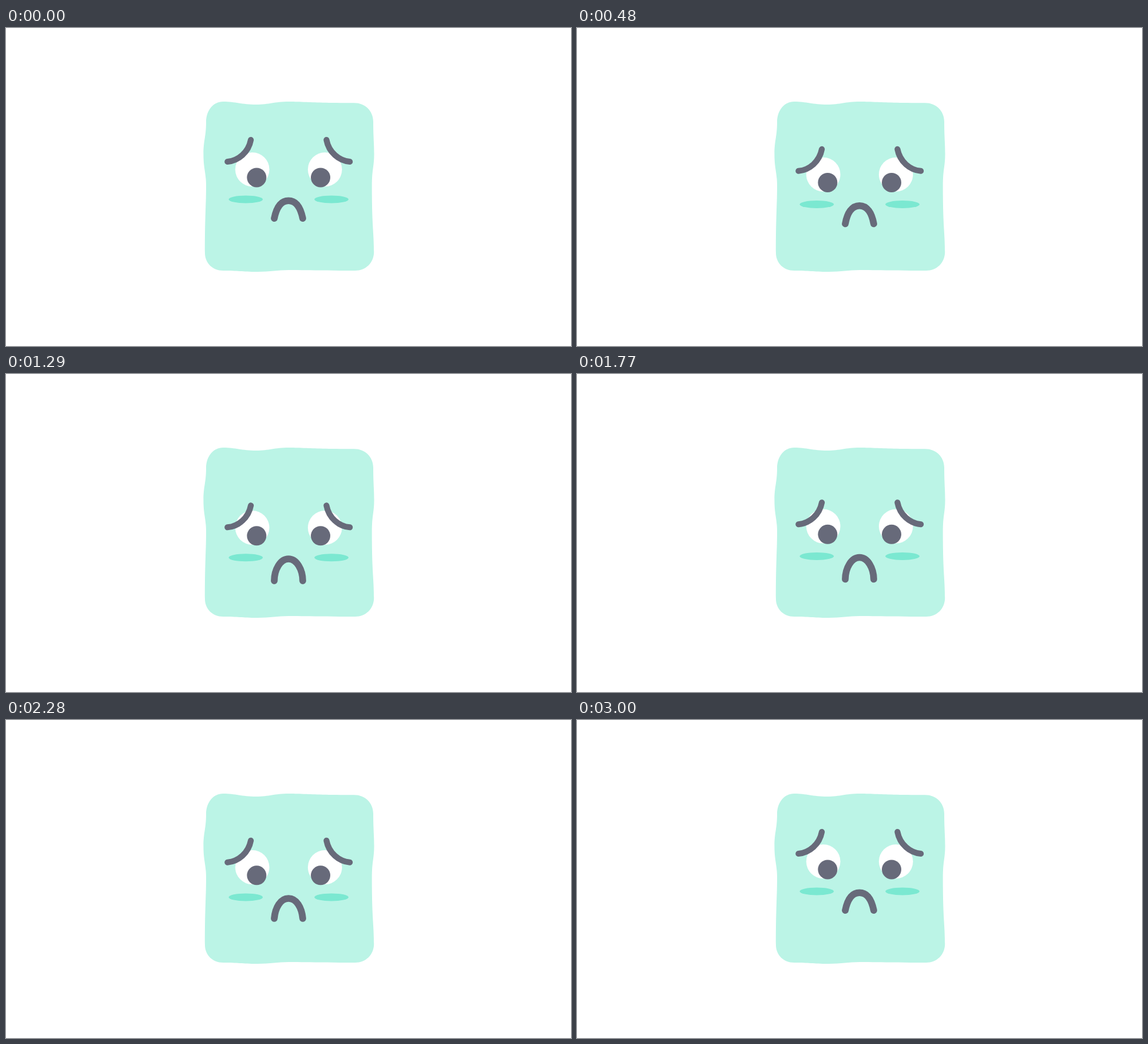
An HTML page for the animation above (3600 ms loop, 960x540 px).

```html
<!DOCTYPE html>
<html lang="en">
<head>
<meta charset="utf-8">
<title>Sad cube</title>
<style>
  html, body { margin: 0; width: 100%; height: 100%; overflow: hidden; background: #fff; }
  svg { display: block; width: 960px; height: 540px; }
  .line { fill: none; stroke: #676a7a; stroke-linecap: round; }
</style>
</head>
<body>
<svg viewBox="0 0 960 540">
  <defs>
    <g id="eye">
      <circle cx="418.5" cy="240.2" r="29" fill="#fff"/>
      <circle cx="425.9" cy="253.9" r="16.5" fill="#676a7a"/>
      <ellipse cx="407.4" cy="291" rx="29" ry="6.5" fill="#7be8d1"/>
    </g>
    <path id="brow" class="line" stroke-width="10" d="M376.3 227C395 225.5 412 211 416 190"/>
  </defs>
  <path fill="#bbf4e6" d="M340 160C340 140 352 125 369 125C390 125 400 130 425 130C448 130 455 125 481 125
    C505 125 515 127 592 127.3C610 127.3 624 141 624 159C624 185 625.5 195 625.5 214
    C625.5 235 621.7 240 621.7 267C621.7 340 625.2 345 625.2 380C625.2 399 611 412 593 412
    C540 412 510 411 481 411C460 411 450 414 427 414C400 414 395 412 369 412
    C351 412 338 399 338 382C338 315 340 305 340 268C340 245 335.5 240 335.5 214
    C335.5 190 340 185 340 160Z"/>
  <g id="face">
    <use href="#eye"/>
    <use href="#eye" transform="matrix(-1 0 0 1 960.4 0)"/>
  </g>
  <path id="mouth" class="line" stroke-width="11.5"/>
  <g id="brows">
    <use href="#brow"/>
    <use href="#brow" transform="matrix(-1 0 0 1 960.5 0)"/>
  </g>
</svg>
<script>
const LOOP = 3600, STEP = 30;
const $ = id => document.getElementById(id);
const clamp = v => Math.min(1, Math.max(0, v));
const mix = (a, b, k) => a + (b - a) * k;

// Ease with flat ends; x1 and x2 are the handle positions in time
function ease(u, x1, x2) {
  u = clamp(u);
  let lo = 0, hi = 1;
  for (let i = 0; i < 24; i++) {
    const s = (lo + hi) / 2, r = 1 - s;
    if (3 * x1 * s * r * r + 3 * x2 * s * s * r + s * s * s < u) lo = s; else hi = s;
  }
  return lo * lo * (3 - 2 * lo);
}

// Each track: rise [start, end, x1, x2], then fall [start, end, x1, x2]
const tracks = {
  face:  [[0, 960, .63, .48], [1080, 3000, .7, .6]],
  brows: [[0, 960, .57, .47], [1080, 3000, .57, .67]],
  mouth: [[360, 960, .333, .667], [1620, 3000, .333, .667]]
};

function level(name, t) {
  const [up, down] = tracks[name].map(([a, b, x1, x2]) => ease((t - a) / (b - a), x1, x2));
  return up - down;
}

function draw(t) {
  const drop = 21 * level('face', t), k = level('mouth', t);
  $('face').setAttribute('transform', `translate(0 ${drop})`);
  $('brows').setAttribute('transform', `translate(0 ${33.8 * level('brows', t)})`);

  const top = 293.2 + drop, end = mix(323.3, 330.4, k) + drop;
  const hx = mix(20.5, 24.1, k), hy = mix(305, 311.5, k) + drop, tx = mix(13, 14, k);
  $('mouth').setAttribute('d',
    `M${480 - 24.2} ${end}C${480 - hx} ${hy} ${480 - tx} ${top} 480 ${top}` +
    `C${480 + tx} ${top} ${480 + hx} ${hy} ${480 + 24.2} ${end}`);
}

const start = performance.now();
function tick() {
  const t = (performance.now() - start) % LOOP;
  draw(Math.floor(t / STEP) * STEP);
  requestAnimationFrame(tick);
}
tick();
</script>
</body>
</html>
```
